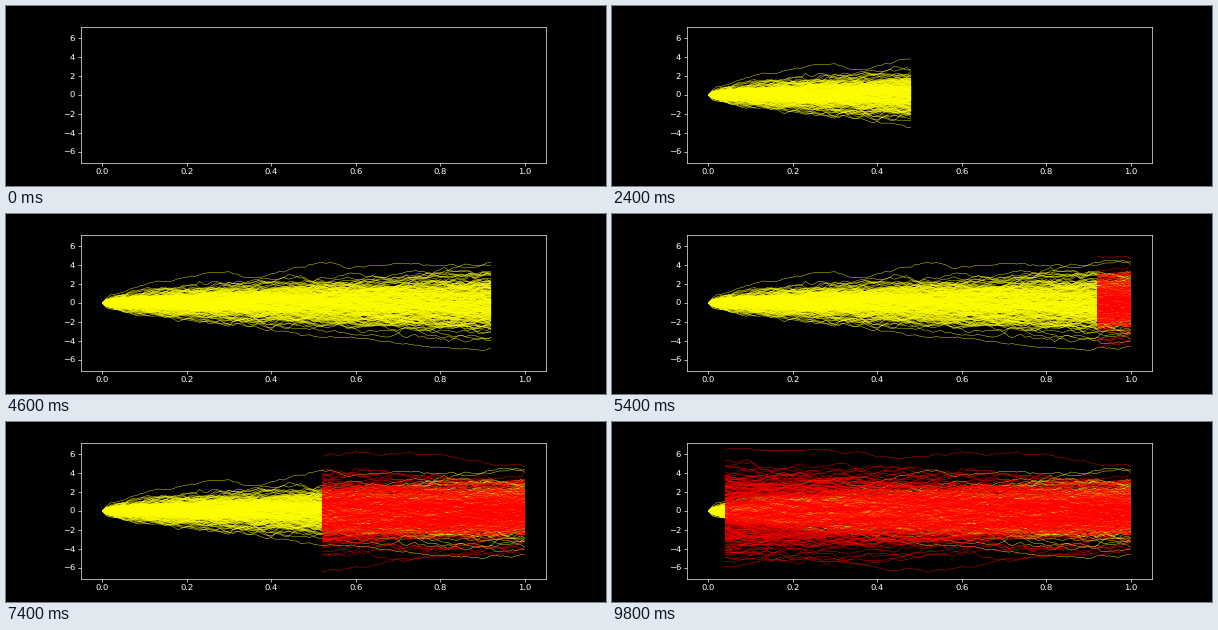
A matplotlib script for the animation above (10000 ms loop, 600 px wide and 180 px high).

```python
import numpy as np
import matplotlib.pyplot as plt
from matplotlib.animation import FuncAnimation
from matplotlib.collections import LineCollection

PATHS, STEPS, PER_FRAME = 260, 100, 4
SIGMA = 1.6
HALF = STEPS // PER_FRAME
rng = np.random.default_rng(11)
t = np.linspace(0, 1, STEPS + 1)


def walks(start, scale=SIGMA):
    steps = rng.normal(0, scale / np.sqrt(STEPS), (len(start), STEPS))
    return start[:, None] + np.c_[np.zeros(len(start)), steps.cumsum(axis=1)]


def bridge(*knots):
    """Random walk through a few (time, value) knots, spreading like sqrt(t)."""
    kt, kv = np.transpose(knots)
    noise = walks(np.zeros(1), 0.9)[0]
    noise -= np.interp(t, kt, np.interp(kt, t, noise))
    return np.interp(np.sqrt(t), np.sqrt(kt), kv) + noise


# Diffusion forward from zero, then on from the end points back in time.
there = walks(np.zeros(2 * PATHS))
back = walks(there[:, -1])
inside = (np.abs(there) <= 3.2 * SIGMA * np.sqrt(t)).all(axis=1)
inside &= (np.abs(there).max(axis=1) < 4.6) & (np.abs(back).max(axis=1) < 5.8)
there, back = there[inside][:PATHS], back[inside][:PATHS]

# The outermost path on each side, both ways.
there = np.vstack([
    there,
    bridge((0, 0), (.25, 3.2), (.37, 2.7), (.48, 3.8), (.7, 4.2), (1, 4.4)),
    bridge((0, 0), (.48, -3.4), (.73, -4.4), (1, -4.6)),
])
back = np.vstack([
    back,
    bridge((0, 6.5), (.28, 6.5), (.4, 5.7), (.6, 6.3), (1, 4.7))[::-1],
    bridge((0, -5.6), (.24, -5.2), (.52, -6.5), (.7, -5), (1, -4.6))[::-1],
])


def polylines(x, paths):
    return np.stack([np.broadcast_to(x, paths.shape), paths], axis=-1)


forward = polylines(t, there)
reverse = polylines(1 - t, back)

plt.style.use("dark_background")
plt.rcParams["text.hinting"] = "none"
fig = plt.figure(figsize=(10, 3), dpi=60)
fig.subplots_adjust(left=.125, right=.9, bottom=.128, top=.883)
ax = fig.add_subplot()
ax.set(xlim=(-.05, 1.05), ylim=(-7.2, 7.2),
       xticks=np.linspace(0, 1, 6), yticks=range(-6, 7, 2))

yellow = LineCollection([], colors="yellow", linewidths=.5, zorder=2)
red = LineCollection([], colors="red", linewidths=.5, zorder=2.1)
ax.add_collection(yellow, autolim=False)
ax.add_collection(red, autolim=False)


def grow(lines, data, count):
    lines.set_segments(data[:, :count + 1] if count > 0 else [])


def draw(frame):
    grow(yellow, forward, PER_FRAME * min(frame, HALF))
    grow(red, reverse, PER_FRAME * (frame - HALF))
    return yellow, red


anim = FuncAnimation(fig, draw, frames=2 * HALF, interval=200,
                     init_func=lambda: draw(0), repeat=True, blit=False)
plt.show()
```
